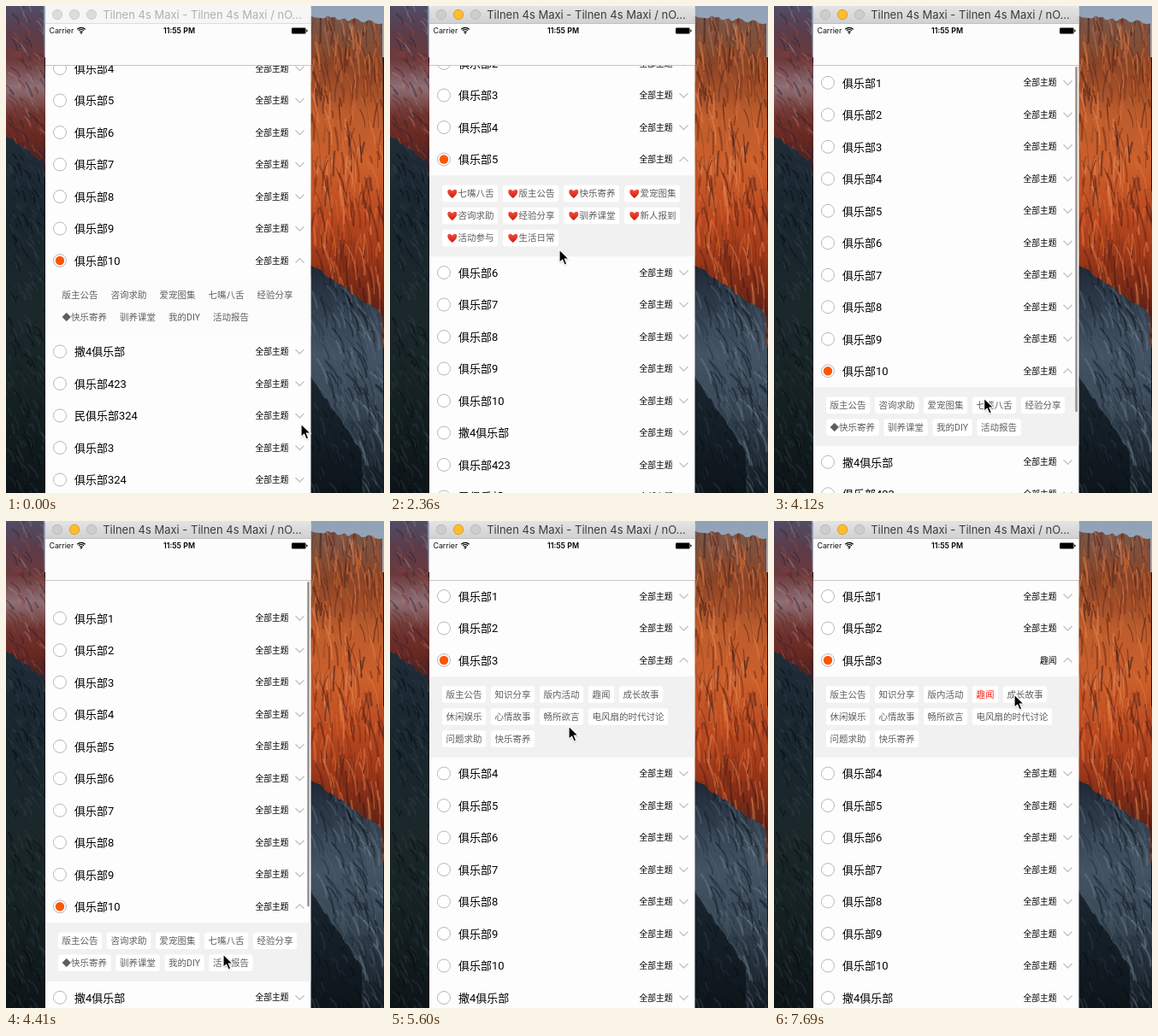
An HTML page with a canvas for the animation above (7.99 s loop, 442x570 px).

```html
<!DOCTYPE html>
<html lang="zh">
<head>
<meta charset="utf-8">
<title>Club list</title>
<style>
html, body { margin: 0; width: 442px; height: 570px; overflow: hidden; background: #111a20; }
canvas { display: block; }
</style>
</head>
<body>
<canvas id="stage" width="442" height="570"></canvas>
<script>
const stage = document.getElementById('stage');
let g = stage.getContext('2d');
const LOOP = 7990, TICK = 147.4;          // the screen updates once per tick
const LEFT = 46, WIDTH = 310.5, NAV = 69, PITCH = 37.5;
const REST = 88, SLOP = 10;               // first row at rest; travel before a drag scrolls
const CJK = "Roboto, 'Noto Sans CJK SC', 'Noto Sans CJK', sans-serif";
const UI = 'Inter, sans-serif';

const clubs = Array.from({ length: 10 }, (_, i) => '俱乐部' + (i + 1))
  .concat('撒4俱乐部', '俱乐部423', '民俱乐部324', '俱乐部3', '俱乐部324');
const topics = {
  3: '版主公告 知识分享 版内活动 趣闻 成长故事|休闲娱乐 心情故事 畅所欲言 电风扇的时代讨论|问题求助 快乐寄养',
  5: '♥七嘴八舌 ♥版主公告 ♥快乐寄养 ♥爱宠图集|♥咨询求助 ♥经验分享 ♥驯养课堂 ♥新人报到|♥活动参与 ♥生活日常',
  7: '聚会出游 家有爱宠 经验分享 寻三大＆领养|显摆秀场 活动报告 娱乐休闲 同城互助 咨询求助|版务公告 ◆快乐寄养',
  10: '版主公告 咨询求助 爱宠图集 七嘴八舌 经验分享|◆快乐寄养 驯养课堂 我的DIY 活动报告'
};

// Pointer stops, by tick, with what the pointer does on arrival (or on the way, for a drag)
const stops = [
  { t: 0, x: 345, y: 489, open: 10 },
  { t: 3, x: 290, y: 175 },
  { t: 5, x: 290, y: 254, drag: true },
  { t: 6, x: 280, y: 254, open: 7 },
  { t: 8, x: 249, y: 164 },
  { t: 9, x: 220, y: 98 },
  { t: 11, x: 220, y: 104, open: 3 },
  { t: 16, x: 198, y: 285, open: 5 },
  { t: 17, x: 205, y: 363 },
  { t: 21, x: 225, y: 462, open: 10 },
  { t: 25, x: 233, y: 387 },
  { t: 30, x: 254, y: 507, drag: true },
  { t: 36, x: 213, y: 163, open: 3 },
  { t: 38, x: 209, y: 240 },
  { t: 46, x: 264, y: 224 },
  { t: 48, x: 264, y: 224, pick: '电风扇的时代讨论' },
  { t: 51, x: 250, y: 205, pick: '趣闻' },
  { t: 52, x: 281, y: 203 }
];

function pointerAt(k) {
  const i = stops.findIndex(s => s.t > k);
  if (i < 0) return stops[stops.length - 1];
  const a = stops[i - 1], b = stops[i], p = (k - a.t) / (b.t - a.t);
  return { x: a.x + (b.x - a.x) * p, y: a.y + (b.y - a.y) * p };
}

// Follows each drag, at half speed past the top, and springs back after release
function scrollAt(k) {
  let y = -39.5;
  stops.forEach((s, i) => {
    const from = stops[i - 1];
    if (!s.drag || k <= from.t) return;
    y += Math.max(0, pointerAt(Math.min(k, s.t)).y - from.y - SLOP);
    const over = Math.max(0, y - REST) / 2;
    y = Math.min(y, REST) + over * Math.exp(-1.2 * Math.max(0, k - s.t));
  });
  return y;
}

const latest = (key, k) => stops.reduce((v, s) => s.t <= k && s[key] || v, '');

function rect(x, y, w, h, color, r = 0) {
  g.fillStyle = color;
  g.beginPath();
  g.roundRect(x, y, w, h, r);
  g.fill();
}

function disc(x, y, r, fill, stroke) {
  g.beginPath();
  g.arc(x, y, r, 0, 7);
  g.fillStyle = fill;
  g.fill();
  if (stroke) line(stroke, 1);
}

function line(color, width) {
  g.strokeStyle = color;
  g.lineWidth = width;
  g.stroke();
}

function poly(points, fill) {
  g.beginPath();
  points.forEach(p => g.lineTo(...p));
  g.closePath();
  g.fillStyle = fill;
  g.fill();
}

// Evenly spaced vertical colours
function fade(y0, y1, ...colors) {
  const grad = g.createLinearGradient(0, y0, 0, y1);
  colors.forEach((c, i) => grad.addColorStop(i / (colors.length - 1), c));
  return grad;
}

// y is the middle of the line
function text(s, x, y, size, color = '#000', align = 'left', family = CJK, weight = 400) {
  g.font = `${weight} ${size}px ${family}`;
  g.textAlign = align;
  g.fillStyle = color;
  g.fillText(s, x, y + size * 0.37);
}

function drawWallpaper() {
  let seed = 11;
  const rnd = () => (seed = seed * 16807 % 2147483647) / 2147483647;
  // a slab of rock with cracks that lean by `lean` for each pixel down
  const rock = (x, w, y0, y1, slope, fill, cracks, len, lean, colors) => {
    g.save();
    g.beginPath();
    for (let i = 0; i <= w; i += 4) g.lineTo(x + i, y0 + i * slope + rnd() * 5);
    g.lineTo(x + w, y1);
    g.lineTo(x, y1);
    g.clip();
    rect(x, y0, w, y1 - y0, fill);
    for (let i = 0; i < cracks; i++) {
      const l = len * (0.2 + rnd()), px = x + rnd() * w, py = y0 - l / 2 + rnd() * (y1 - y0);
      const dx = l * (lean + (rnd() - 0.5) * 0.5);
      g.beginPath();
      g.moveTo(px, py);
      g.quadraticCurveTo(px + dx + (rnd() - 0.5) * 4, py + l / 2, px + dx, py + l);
      line(colors[i % colors.length], 0.5 + rnd() * 2);
    }
    g.restore();
  };
  rect(0, 0, 442, 60, fade(0, 60, '#8fa2b8', '#a3a7b3'));
  rock(0, 47, -8, 200, 0, fade(0, 190, '#4f4d66', '#5b3c4a', '#6d3a3c', '#8d6f75', '#6f332f', '#672822', '#2b1f28'),
    130, 16, 0.6, ['#2a203066', '#a4483066', '#a8a0b044', '#4a1f2266']);
  rock(0, 47, 148, 570, 0.75, fade(150, 570, '#202d3a', '#18252d', '#1b272a', '#152023', '#0c1418'),
    300, 14, 0.5, ['#35474f55', '#060c1077', '#3e4a4a44']);
  rock(356, 86, 8, 400, 0.12, fade(10, 360, '#77584c', '#8a4527', '#bd5c2c', '#cb602c', '#bb4a20', '#973519', '#5c2015'),
    420, 38, 0.05, ['#32161477', '#f2955a66', '#7a281677', '#dd692f77', '#4c1c1666']);
  rock(356, 86, 300, 570, 0.7, fade(300, 570, '#1d2633', '#313f4e', '#435363', '#3b4a59', '#26323d', '#10181e'),
    320, 34, 0.45, ['#8799a944', '#0c141c77', '#52647455', '#1c283377']);
  rock(356, 60, 430, 570, 1.5, fade(430, 570, '#1b2630', '#0d151b'), 70, 18, 0.4, ['#3a4a5655', '#060c1077']);
}

function drawWindow(active) {
  rect(LEFT, 0, WIDTH, 570, '#fdfdfd');
  rect(LEFT, 0, WIDTH, 20.5, active ? fade(0, 20, '#e4e4e4', '#d1d1d1') : '#f6f6f6', [4, 4, 0, 0]);
  rect(LEFT, 20, WIDTH, 0.8, active ? '#b5b5b5' : '#d5d5d5');
  [60, 80, 100].forEach((x, i) => {
    const lit = active && i === 1;
    disc(x, 10, 5.7, lit ? '#fdbd2e' : active ? '#cdcdcd' : '#dcdcdc', lit ? '#dfa023' : active ? '#bcbcbc' : '#cfcfcf');
  });
  text('Tilnen 4s Maxi - Tilnen 4s Maxi / nO...', 229.5, 10.5, 13, active ? '#3c3c3c' : '#b0b0b0', 'center', UI);
}

function drawNav() {
  rect(LEFT, 21, WIDTH, NAV - 21, '#fcfcfc');
  rect(LEFT, NAV, WIDTH, 0.8, '#b4b4b4');
  text('Carrier', 50.5, 29, 8.8, '#111', 'left', UI);
  text('11:55 PM', 202.5, 29, 8.8, '#000', 'center', UI, 600);
  for (let r = 2.2; r < 7; r += 2.2) {
    g.beginPath();
    g.arc(88, 32, r, -Math.PI * 0.75, -Math.PI * 0.25);
    line('#000', 1.3);
  }
  disc(88, 31.8, 0.9, '#000');
  rect(334, 25.5, 16.5, 7, '#000', 1.2);
  rect(351.2, 27.6, 1.2, 2.8, '#000', 0.6);
}

function drawHeart(x, y) {
  g.beginPath();
  g.moveTo(x, y + 5.5);
  g.bezierCurveTo(x - 9, y - 0.5, x - 5.5, y - 8, x, y - 3);
  g.bezierCurveTo(x + 5.5, y - 8, x + 9, y - 0.5, x, y + 5.5);
  g.fillStyle = fade(y - 5, y + 5, '#f4503c', '#cf1d12');
  g.fill();
}

const panelHeight = lines => lines.length * 26 + 17;

function drawTopics(lines, top, choice, active) {
  rect(LEFT, top, WIDTH, panelHeight(lines), active ? '#f1f1f1' : '#fcfcfc');
  lines.forEach((tags, row) => {
    let x = 61;
    const y = top + 21.25 + row * 26;
    tags.split(' ').forEach(tag => {
      const word = tag.replace('♥', ''), icon = word === tag ? 0 : 14;
      g.font = '10.5px ' + CJK;
      const w = g.measureText(word).width + 9.2 + icon;
      rect(x, y - 9.7, w, 19.4, active ? '#fff' : '#fcfcfc', 3);
      if (icon) drawHeart(x + 11.8, y);
      text(word, x + 4.6 + icon, y, 10.5, word === choice ? '#ff1e14' : '#5e5e5e');
      x += w + 5.8;
    });
  });
}

function drawRow(name, y, open, label) {
  disc(63, y, 7.5, '#fff', '#b8b8b8');
  if (open) disc(63, y, 5.2, '#ff5500');
  text(name, 80, y, 13);
  text(label, 330.5, y, 9.75, '#000', 'right');
  const d = open ? -2.5 : 2.5;
  g.beginPath();
  g.moveTo(338.5, y - d);
  g.lineTo(343.5, y + d);
  g.lineTo(348.5, y - d);
  line('#c4c4c8', 1.4);
}

function drawList(k) {
  const open = latest('open', k), choice = latest('pick', k), first = scrollAt(k);
  g.save();
  g.beginPath();
  g.rect(LEFT, NAV, WIDTH, 570 - NAV);
  g.clip();
  let y = first;
  clubs.forEach((name, i) => {
    const isOpen = i + 1 === open;
    drawRow(name, y, isOpen, isOpen && choice || '全部主题');
    if (isOpen) {
      const lines = topics[open].split('|');
      drawTopics(lines, y + PITCH / 2, choice, k > 0);
      y += panelHeight(lines);
    }
    y += PITCH;
  });
  // the scroll bar lingers for two ticks after movement
  if (Math.abs(first - scrollAt(k - 2)) > 0.8) {
    const past = first - REST;
    rect(352.3, 71 + Math.max(0, -past) * 0.8, 2.4, 406 - Math.max(0, past), '#8f8f8f', 1.2);
  }
  g.restore();
}

function drawPointer({ x, y }) {
  g.save();
  g.translate(x, y);
  g.shadowColor = '#0005';
  g.shadowBlur = 2;
  g.shadowOffsetY = 1;
  poly([[0, 0], [0, 15.5], [3.6, 12.2], [6.1, 18], [8.8, 16.8], [6.4, 11.2], [11.2, 11.2]], '#000');
  g.shadowColor = 'transparent';
  line('#fff', 1.2);
  g.restore();
}

const screen = g;
const wallpaper = document.createElement('canvas');
wallpaper.width = 442;
wallpaper.height = 570;
g = wallpaper.getContext('2d');
drawWallpaper();
g = screen;

function frame() {
  const k = Math.floor((performance.now() % LOOP + 15) / TICK);
  g.drawImage(wallpaper, 0, 0);
  drawWindow(k > 0);
  drawList(k);
  drawNav();
  drawPointer(pointerAt(k));
  requestAnimationFrame(frame);
}
frame();
</script>
</body>
</html>
```
